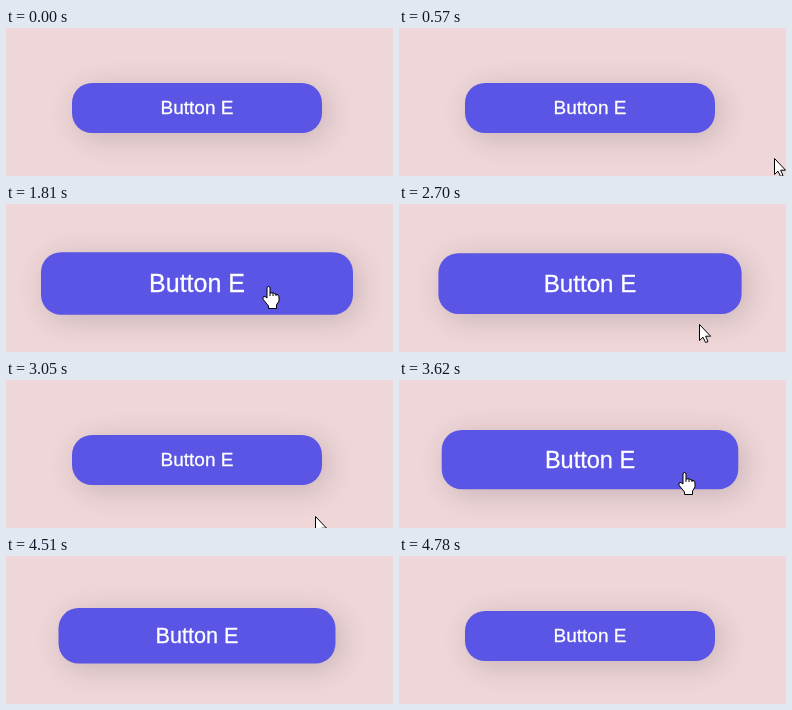
An HTML page with a canvas for the animation above (5020 ms loop, 387x148 px).

```html
<!DOCTYPE html>
<html>
<head>
<meta charset="utf-8">
<style>
html, body { margin: 0; width: 100%; height: 100%; overflow: hidden; background: #efd6d9; }
canvas { display: block; }
</style>
</head>
<body>
<canvas id="stage" width="387" height="148"></canvas>
<script>
const LOOP = 5020, GROW = 400;
const ctx = document.getElementById('stage').getContext('2d');

const arrow = new Path2D('M.5 .5V16.5L4 13.2 6.6 18.5 9 17.5 6.6 12.2H11.6Z');
const hand = new Path2D('M5 12V2Q5 .5 6.5 .5T8 2V7Q12 6 13 8Q17 8 17 11V15L14.5 19V22.5H6.5V20' +
  'L.8 13Q.5 10 3 10.5ZM8 7V10M11 7V10M14 8V10');

// Pointer over the button: enter, leave
const hovers = [[1410, 2650], [3440, 4380]];

// Pointer moves: start, end, x, y, sideways lead
const moves = [
  [470, 560, 375, 130, 0],
  [1227, 1610, 262, 82, .52],
  [2400, 2870, 309, 136, .12],
  [3340, 3510, 285, 92, 0],
  [4280, 4500, 345, 160, 0]
];

const clamp = v => Math.max(0, Math.min(1, v));

// CSS "ease": cubic-bezier(.25, .1, .25, 1)
function ease(x) {
  if (x <= 0 || x >= 1) return clamp(x);
  const bez = (a, b, s) => 3 * a * s * (1 - s) ** 2 + 3 * b * s * s * (1 - s) + s ** 3;
  let lo = 0, hi = 1;
  for (let i = 0; i < 20; i++) {
    const mid = (lo + hi) / 2;
    if (bez(.25, .25, mid) < x) lo = mid; else hi = mid;
  }
  return bez(.1, 1, lo);
}

function pointerAt(t) {
  let x = 388, y = 149;
  for (const [start, end, toX, toY, lead] of moves) {
    const u = clamp((t - start) / (end - start));
    const k = u * u * (3 - 2 * u);
    x += (toX - x) * (k + lead * 4 * u * (1 - u));
    y += (toY - y) * k;
    if (u < 1) break;
  }
  return [Math.round(x), Math.round(y)];
}

function drawButton(p) {
  const w = 250 + 62 * p, h = 50 + 63 * p / 5, cy = 80 - p / 2;
  ctx.save();
  ctx.shadowColor = 'rgba(0,0,0,.17)';
  ctx.shadowBlur = 30;
  ctx.shadowOffsetX = ctx.shadowOffsetY = 5;
  ctx.fillStyle = '#5a55e4';
  ctx.beginPath();
  ctx.roundRect(191 - w / 2, cy - h / 2, w, h, 20);
  ctx.fill();
  ctx.restore();

  const size = 19 + 6 * p;
  ctx.font = size + 'px Arial, "Liberation Sans", sans-serif';
  ctx.textAlign = 'center';
  ctx.fillStyle = ctx.strokeStyle = '#fff';
  ctx.lineWidth = .3;
  for (const paint of ['fillText', 'strokeText']) ctx[paint]('Button E', 191, 79.5 + size * .345);
}

function drawTip(alpha) {
  ctx.save();
  ctx.globalAlpha = alpha;
  ctx.fillStyle = '#f7f7f9';
  ctx.strokeStyle = '#8a8a8a';
  ctx.lineWidth = 1;
  ctx.fillRect(352, 119, 60, 40);
  ctx.strokeRect(352.5, 119.5, 60, 40);
  ctx.font = '14px "Open Sans", sans-serif';
  ctx.textAlign = 'left';
  ctx.fillStyle = '#575757';
  ctx.fillText('Pause', 358, 142);
  ctx.restore();
}

function drawPointer([x, y], isHand) {
  const shape = isHand ? hand : arrow;
  ctx.save();
  ctx.translate(x - (isHand ? 6 : 0), y);
  ctx.lineWidth = 1;
  ctx.fillStyle = '#fff';
  ctx.strokeStyle = '#000';
  ctx.fill(shape);
  ctx.stroke(shape);
  ctx.restore();
}

function draw(t) {
  ctx.fillStyle = '#efd6d9';
  ctx.fillRect(0, 0, 387, 148);

  let grow = 0, over = false;
  for (const [enter, leave] of hovers) {
    grow += ease((t - enter) / GROW) - ease((t - leave) / GROW);
    over = over || (t >= enter && t < leave);
  }
  drawButton(grow);

  const tip = Math.min(clamp((t - 1110) / 140), clamp((1430 - t) / 170));
  if (tip > 0) drawTip(tip);

  drawPointer(pointerAt(t), over);
}

const start = performance.now();
function tick() {
  draw((performance.now() - start) % LOOP);
  requestAnimationFrame(tick);
}
tick();
</script>
</body>
</html>
```
